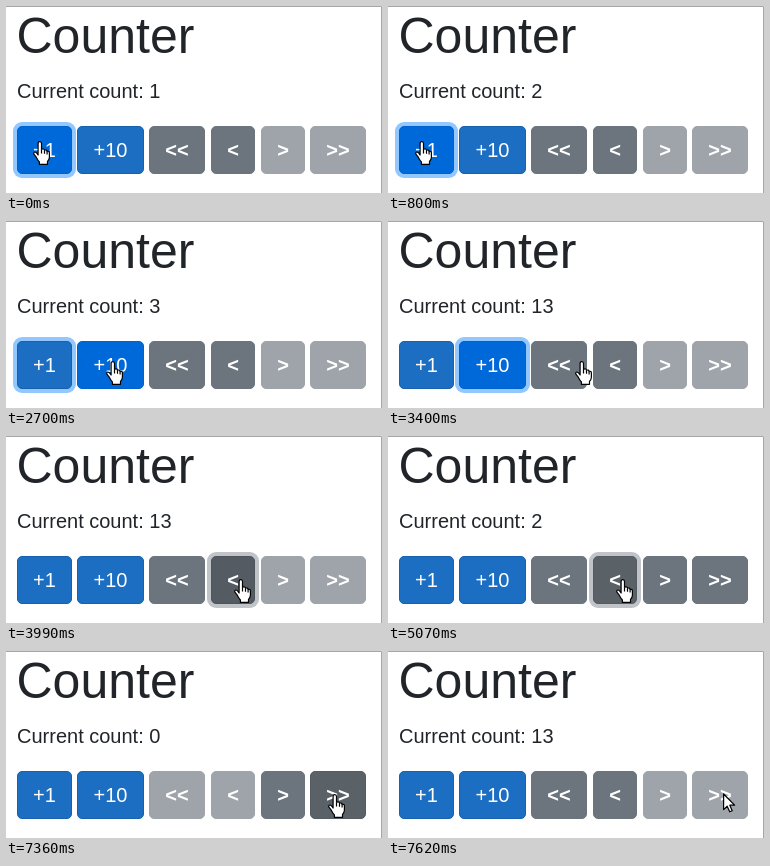
Recreate the animation shown at these times as an HTML page. Size 376 px wide and 187 px high, loop 8 s.

```html
<!DOCTYPE html>
<html lang="en">
<head>
<meta charset="utf-8">
<title>Counter</title>
<style>
  html, body { margin: 0; width: 100%; height: 100%; overflow: hidden; background: #fff; }
  svg { display: block; width: 376px; height: 187px; }
  text { font: 20px "Liberation Sans", Arial, sans-serif; fill: #212529; }
  .title { font-size: 50px; }
  .label { fill: #fff; }
  .arrows { font-weight: 700; }
  .cursor { fill: #fff; stroke: #000; stroke-width: 1.2; stroke-linejoin: round; }
</style>
</head>
<body>
<svg id="stage" viewBox="0 0 376 187">
  <path d="M0 .5H375.5V187" fill="none" stroke="#a6a6a6"/>
  <text class="title" x="10.5" y="47">Counter</text>
  <text id="count" x="11" y="92"></text>
  <g id="buttons"></g>
  <g id="hand" class="cursor">
    <path d="M5.1 14V2.6Q5.1.7 6.8.7T8.5 2.6V8.2Q11.2 7.3 11.5 9.2Q13.7 8.5 14.1 10.3Q16.4 9.9 16.4 12.2V16.2Q16.3 18.4 14.5 20.4V23.3H6.4V21Q4.8 19.2 3.4 16.4L.9 13.2Q.2 11.4 1.8 11Q3.2 10.8 5.1 14Z"/>
    <path d="M8.5 8.2V12.6M11.5 9.2V12.8M14.1 10.3V13.4" fill="none"/>
  </g>
  <path id="arrow" class="cursor" d="M.6 1V16.6L4.2 13.2L6.7 18.8L9.2 17.7L6.8 12.2H11.6Z"/>
</svg>
<script>
const LOOP = 8000;

// Each look is [fill, border].
const THEMES = {
  primary: {
    ring: 'rgba(38,143,255,.5)',
    idle: ['#1b6ec2', '#1861ac'], hover: ['#0069d9', '#0062cc'], active: ['#0062cc', '#005cbf']
  },
  secondary: {
    ring: 'rgba(130,138,145,.5)',
    idle: ['#6c757d', '#6c757d'], hover: ['#5a6268', '#545b62'], active: ['#545b62', '#4e555b']
  }
};

const BUTTONS = [
  ['+1', 11, 55, 'primary'],
  ['+10', 71, 67, 'primary'],
  ['<<', 143, 56, 'secondary'],
  ['<', 205, 44, 'secondary'],
  ['>', 255, 44, 'secondary'],
  ['>>', 304, 56, 'secondary']
];
const [INC, INC10, FIRST, BACK, NEXT, LAST] = BUTTONS.keys();

// Every step changes only the properties it names; ring is [button, spread, opacity].
const STEPS = [
  [0, { count: 1, cursor: 'hand', pos: [27, 135], over: INC, look: 'hover', ring: [INC, 4], off: [NEXT, LAST] }],
  [800, { count: 2 }],
  [1780, { count: 3 }],
  [2310, { pos: [76, 137] }],
  [2460, { pos: [88, 138], over: INC10 }],
  [2590, { pos: [100, 140] }],
  [2710, { pos: [103, 140], look: 'active', ring: [INC10, 2] }],
  [2840, { ring: [INC10, 4] }],
  [2960, { count: 13, look: 'hover' }],
  [3400, { pos: [187, 140] }],
  [3550, { pos: [226, 143], over: BACK }],
  [3700, { pos: [228, 143] }],
  [3860, { look: 'active', ring: [BACK, 2] }],
  [3990, { ring: [BACK, 4] }],
  [4140, { count: 3, look: 'hover', off: [] }],
  [5070, { count: 2 }],
  [5870, { count: 1 }],
  [6580, { count: 0, cursor: 'arrow', pos: [232, 142], ring: [BACK, 3.5, .7], off: [FIRST, BACK] }],
  [6710, { over: null, ring: null }],
  [6980, { cursor: 'hand', pos: [262, 143], over: NEXT }],
  [7110, { pos: [302, 143], over: LAST }],
  [7240, { pos: [322, 143] }],
  [7370, { pos: [330, 143] }],
  [7490, { count: 13, cursor: 'arrow', pos: [335, 142], ring: [LAST, 2], off: [NEXT, LAST] }],
  [7620, { over: null, ring: null }]
];

const byId = id => document.getElementById(id);

function add(parent, tag, attrs) {
  const node = document.createElementNS('http://www.w3.org/2000/svg', tag);
  setAttrs(node, attrs);
  return parent.appendChild(node);
}

function setAttrs(node, attrs) {
  for (const key in attrs) node.setAttribute(key, attrs[key]);
}

const views = BUTTONS.map(([label, x, width, theme]) => {
  const group = add(byId('buttons'), 'g', {});
  const ring = add(group, 'rect', { fill: THEMES[theme].ring });
  const face = add(group, 'rect', { x: x + .5, y: 120.5, width: width - 1, height: 47, rx: 4.5 });
  const text = add(group, 'text', {
    x: x + width / 2, y: 151, 'text-anchor': 'middle',
    class: theme === 'primary' ? 'label' : 'label arrows'
  });
  text.textContent = label;
  return { group, ring, face, x, width, theme: THEMES[theme] };
});

function stateAt(time) {
  const past = STEPS.filter(([start]) => start <= time);
  return Object.assign({}, ...past.map(([, change]) => change));
}

function drawButton(view, index, state) {
  const [fill, stroke] = view.theme[state.over === index ? state.look : 'idle'];
  setAttrs(view.face, { fill, stroke });
  setAttrs(view.group, { opacity: state.off.includes(index) ? .65 : 1 });

  const [owner, spread, opacity = 1] = state.ring || [];
  const focused = owner === index;
  setAttrs(view.ring, { visibility: focused ? 'visible' : 'hidden' });
  if (focused) {
    setAttrs(view.ring, {
      x: view.x - spread, y: 120 - spread, rx: 5 + spread, opacity,
      width: view.width + 2 * spread, height: 48 + 2 * spread
    });
  }
}

function render(time) {
  const state = stateAt(time);
  byId('count').textContent = `Current count: ${state.count}`;
  views.forEach((view, index) => drawButton(view, index, state));
  for (const name of ['hand', 'arrow']) {
    setAttrs(byId(name), {
      visibility: state.cursor === name ? 'visible' : 'hidden',
      transform: `translate(${state.pos})`
    });
  }
}

const begin = performance.now();
function tick() {
  render((performance.now() - begin) % LOOP);
  requestAnimationFrame(tick);
}
tick();
</script>
</body>
</html>
```
